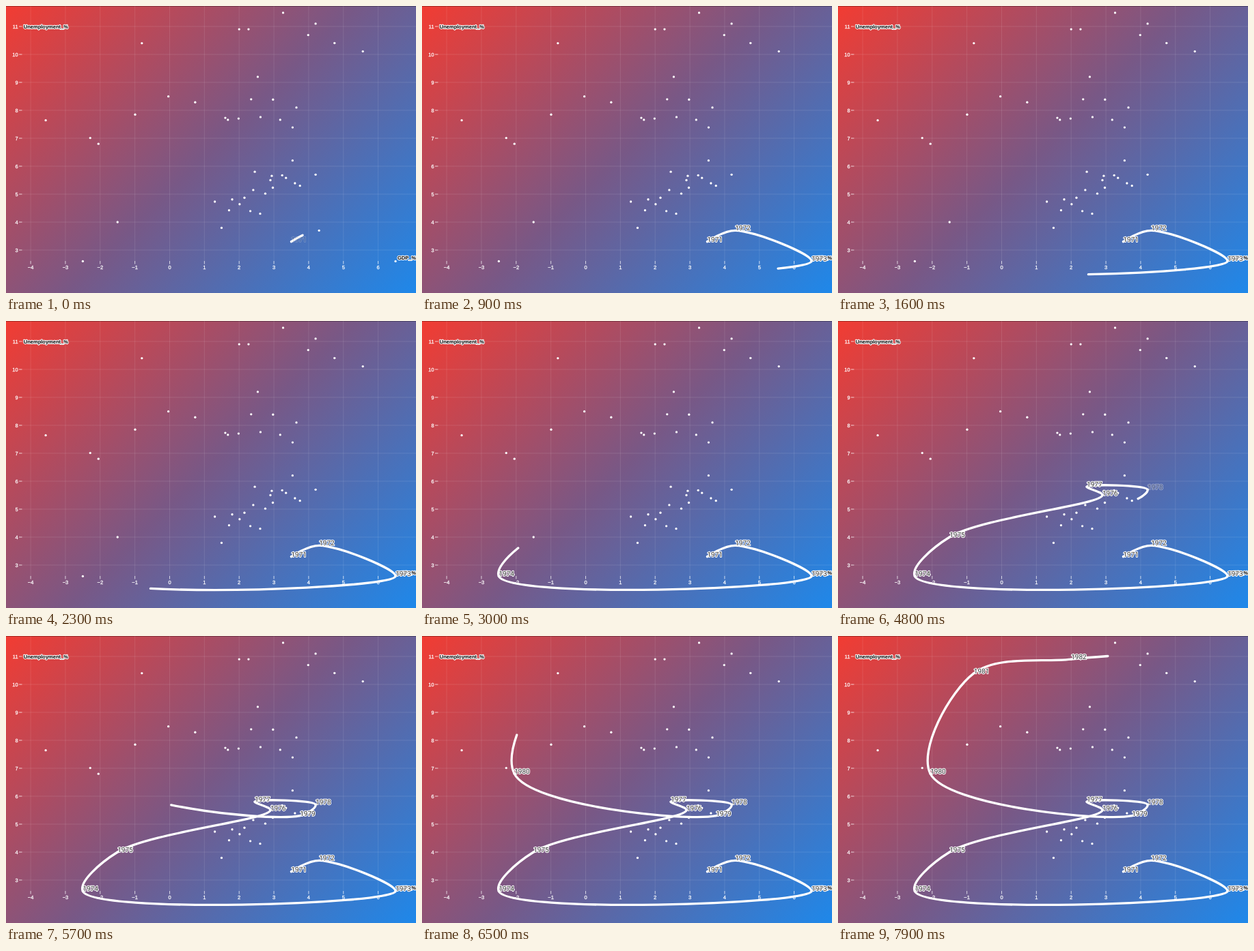
Animation of 600x421 px, one loop 8 s. Source, as an HTML page:

```html
<!DOCTYPE html>
<html lang="en">
<head>
<meta charset="utf-8">
<title>Unemployment and GDP</title>
<style>
  html, body { margin: 0; width: 100%; height: 100%; overflow: hidden; }
  svg { display: block; width: 100vw; height: 100vh; background: linear-gradient(135deg, #f23c32, #785886 50%, #1e88ea); }
  text { font: 7.5px "Liberation Sans", Helvetica, Arial, sans-serif; fill: #fff; text-rendering: geometricPrecision; }
  .label { stroke: #fff; stroke-width: .25; }
  .tick { stroke: #fff; stroke-width: .75; }
  .grid { stroke: #fff; stroke-opacity: .1; }
  .edge { stroke: #000; stroke-opacity: .3; }
  .title, .year { paint-order: stroke; stroke: #fff; stroke-linejoin: round; }
  .title { font-weight: bold; fill: #000; stroke-width: 2.2; }
  .year { font: 10px Roboto, sans-serif; fill: #333; stroke-width: 2.2; }
  #trail { fill: none; stroke: #fff; stroke-width: 3.3; stroke-linecap: round; stroke-linejoin: round; }
</style>
</head>
<body>
<svg id="chart" viewBox="0 0 600 421" xmlns="http://www.w3.org/2000/svg"></svg>
<script>
const LOOP = 8000, STEP = 100, FADE = 250;
const FIRST_YEAR = 1971, LAST_SHOWN = 1982;
const AXIS_X = 23.5, AXIS_Y = 374;
const svg = document.getElementById('chart');

const xOf = gdp => 239.5 + gdp * 50.85;
const yOf = rate => 358 - (rate - 3) * 41;

// Yearly [GDP, unemployment] in percent: the key points of the trail.
const route = [
  [3.5, 3.3], [4.3, 3.7], [6.5, 2.6], [-2.5, 2.6], [-1.5, 4], [2.9, 5.5], [2.45, 5.8],
  [4.2, 5.7], [3.75, 5.3], [-2.05, 6.8], [-.8, 10.4], [2, 10.9], [4.2, 11.1], [2.27, 10.9]
].map(([gdp, rate]) => [xOf(gdp), yOf(rate)]);

// Later years fall into loose groups; tilt is the rise across a group.
const groups = [
  { count: 16, gdp: 2.5, rate: 4.9, width: 2.4, height: 1.5, tilt: 1.6 },
  { count: 10, gdp: 2.6, rate: 8.3, width: 2.4, height: 2.4, tilt: .4 },
  { count: 4, gdp: 4.4, rate: 10.7, width: 3.4, height: .6, tilt: -1.6 },
  { count: 5, gdp: -1.4, rate: 7.9, width: 5, height: 2.8, tilt: .8 }
];

let seed = 7;
function random() {
  seed = (seed * 16807) % 2147483647;
  return seed / 2147483647;
}

function scatter({ count, gdp, rate, width, height, tilt }) {
  return Array.from({ length: count }, (_, i) => {
    const u = (i + random()) / count - .5;
    return [xOf(gdp + width * u), yOf(rate + tilt * u + height * (random() - .5))];
  });
}

function add(tag, attrs, content = '') {
  const el = document.createElementNS('http://www.w3.org/2000/svg', tag);
  for (const key in attrs) el.setAttribute(key, attrs[key]);
  el.textContent = content;
  svg.append(el);
  return el;
}

function line(kind, x1, y1, x2, y2) {
  add('line', { class: kind, x1, y1, x2, y2 });
}

function drawAxes() {
  line('edge', 0, .5, 600, .5);
  for (let v = -4; v <= 6; v++) {
    const x = xOf(v);
    line('grid', x, 0, x, AXIS_Y);
    line('tick', x, AXIS_Y, x, AXIS_Y + 4.5);
    add('text', { class: 'label', x, y: 385.6, 'text-anchor': 'middle' }, String(v).replace('-', '\u2212'));
  }
  for (let v = 3; v <= 11; v++) {
    const y = yOf(v);
    line('grid', AXIS_X, y, 600, y);
    line('tick', AXIS_X - 4.5, y, AXIS_X, y);
    add('text', { class: 'label', x: 17.6, y: y + 2.6, 'text-anchor': 'end' }, v);
  }
}

function drawTitles() {
  add('text', { class: 'title', x: 25.8, y: 32.7 }, 'Unemployment_%');
  add('text', { class: 'title', x: 600, y: 372, 'text-anchor': 'end' }, 'GDP_%');
}

// Centripetal Catmull-Rom handle at b, on the side facing c.
function handle(a, b, c) {
  if (!a) return b;
  const d1 = Math.sqrt(Math.hypot(b[0] - a[0], b[1] - a[1]));
  const d2 = Math.sqrt(Math.hypot(c[0] - b[0], c[1] - b[1]));
  return [0, 1].map(k =>
    b[k] + (d1 * d1 * (c[k] - b[k]) + d2 * d2 * (b[k] - a[k])) / (3 * d1 * (d1 + d2)));
}

drawAxes();
for (const [cx, cy] of [...route, ...groups.flatMap(scatter)]) add('circle', { cx, cy, r: 1.65, fill: '#fff' });
drawTitles();

const trail = add('path', { id: 'trail' });
const reached = [0];
let d = 'M' + route[0];
for (let i = 0; i < route.length - 1; i++) {
  const [before, from, to, after] = [-1, 0, 1, 2].map(k => route[i + k]);
  d += `C${handle(before, from, to)} ${handle(after, to, from)} ${to}`;
  trail.setAttribute('d', d);
  reached.push(trail.getTotalLength());
}

function lengthAtX(x, from) {
  let s = from;
  while (s < reached.at(-1) && trail.getPointAtLength(s).x < x) s += .25;
  return s;
}

// The pen moves at constant speed between these two places.
const startLength = lengthAtX(434, 0);
const endLength = lengthAtX(394, reached[LAST_SHOWN - FIRST_YEAR]);
const speed = (endLength - startLength) / 7900;

const years = route.slice(0, LAST_SHOWN - FIRST_YEAR + 1).map(([x, y], i) => ({
  el: add('text', { class: 'year', x, y }, FIRST_YEAR + i),
  start: (reached[i] / speed) * .995 - startLength / speed
}));

function easeCubic(u) {
  u = Math.min(1, Math.max(0, u));
  return u < .5 ? 4 * u ** 3 : 1 - 4 * (1 - u) ** 3;
}

function render(time) {
  const t = Math.floor((time % LOOP) / STEP) * STEP;
  trail.setAttribute('stroke-dasharray', `${startLength + speed * t} 9999`);
  for (const { el, start } of years) el.setAttribute('opacity', easeCubic((t - start) / FADE));
}

const begin = performance.now();
function tick() {
  render(performance.now() - begin);
  requestAnimationFrame(tick);
}
tick();
</script>
</body>
</html>
```
